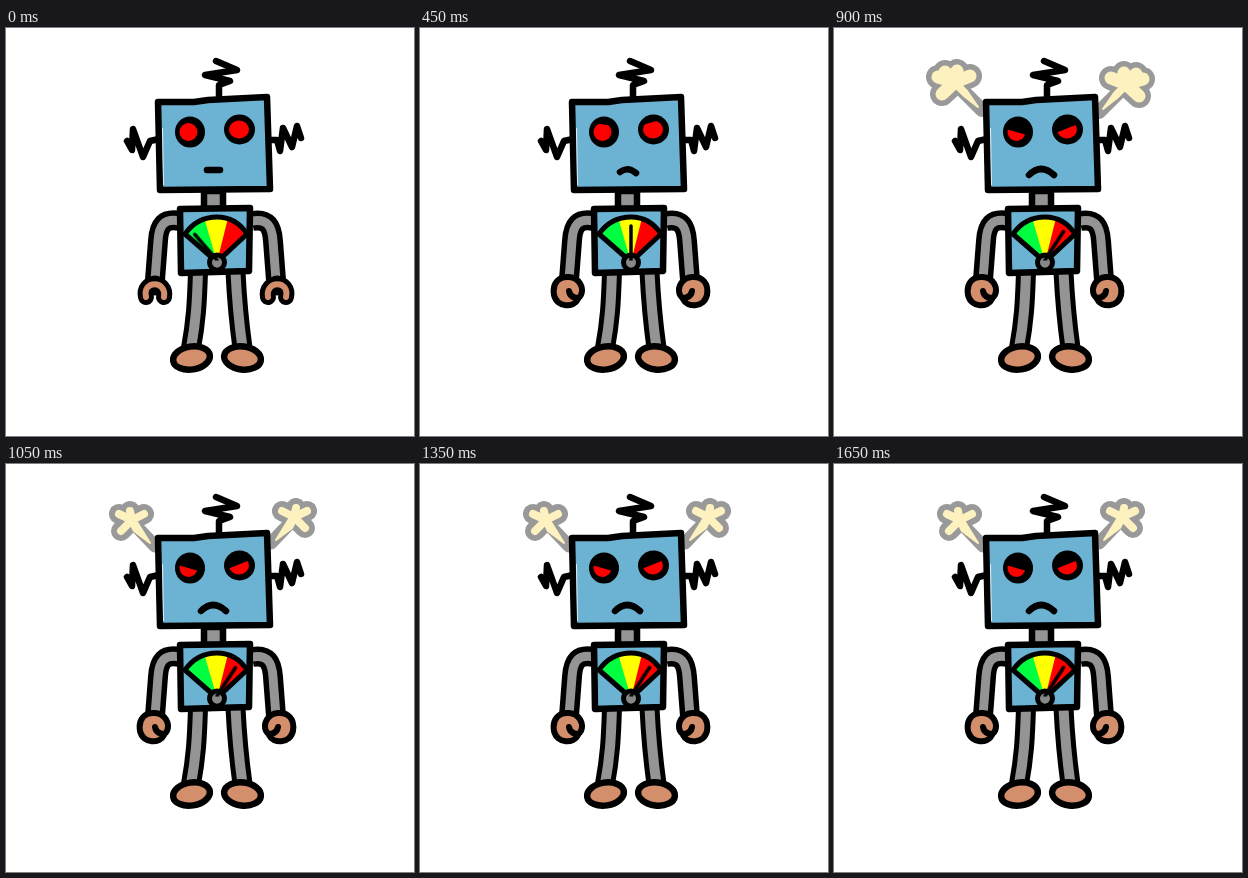
Recreate the animation shown at these times as an HTML page without scripts. Size 408x408 px, loop 1800 ms.

```html
<!DOCTYPE html>
<html lang="en">
<head>
<meta charset="utf-8">
<title>Robot losing its temper</title>
<style>
  html, body { margin: 0; width: 100%; height: 100%; overflow: hidden; background: #fff; }
  svg { display: block; width: 100vw; height: 100vh; }
  .ink { fill: none; stroke: #000; stroke-width: 6.5; stroke-linecap: round; stroke-linejoin: round; }
  .blue { fill: #6cb2d3; }
  .skin { fill: #d38e6c; }
  .tube { fill: none; stroke: #000; stroke-width: 20; }
  .core { fill: none; stroke: #949494; stroke-width: 9; }
  .steam { fill: none; stroke-linecap: round; stroke-linejoin: round; }
  .edge { stroke: #999; }
  .puff { stroke: #fdf2bf; }

  /* Twelve beats of 150 ms */
  .needle, .open, .closed, .big, .small { animation: 1.8s step-end infinite; }
  .needle { animation-name: needle; transform-origin: 211px 232px; }
  .open { animation-name: open; }
  .closed { animation-name: closed; }
  .big { animation-name: big; }
  .small { animation-name: small; }
  @keyframes needle {
    0% { transform: rotate(-41deg); }
    8.3333% { transform: rotate(-27deg); }
    16.6667% { transform: rotate(-13deg); }
    25% { transform: rotate(0deg); }
    33.3333% { transform: rotate(17deg); }
    41.6667%, 100% { transform: rotate(33deg); }
  }
  @keyframes open { 0% { opacity: 1; } 25%, 100% { opacity: 0; } }
  @keyframes closed { 0% { opacity: 0; } 25%, 100% { opacity: 1; } }
  @keyframes big {
    0%, 58.3333%, 75%, 91.6667%, 100% { opacity: 0; }
    50%, 66.6667%, 83.3333% { opacity: 1; }
  }
  @keyframes small {
    0%, 50%, 66.6667%, 83.3333% { opacity: 0; }
    58.3333%, 75%, 91.6667%, 100% { opacity: 1; }
  }
</style>
</head>
<body>
<svg viewBox="0 0 408 408">
  <defs>
    <clipPath id="eyeL"><circle cx="184" cy="104" r="14"/></clipPath>
    <clipPath id="eyeR"><circle cx="233.500" cy="101.500" r="14"/></clipPath>
    <clipPath id="fan"><path id="dial" d="M179 206Q191 189 211 189Q230 189 241 206L211 234Z"/></clipPath>

    <path id="cloud" d="M121 54L104 49M121 54L111 44M121 54L123 43M121 54L136 48M121 54L108 66"/>
    <path id="wisp" d="M126 56L113 50M126 56L124 47M126 56L138 50M126 56L115 67"/>
    <g id="plume">
      <use href="#cloud" class="edge" stroke-width="24"/>
      <path d="M124 58L148 82" class="edge" stroke-width="14"/>
      <use href="#cloud" class="puff" stroke-width="13"/>
      <path d="M120 58L130 68L144 79L133 63L125 55Z" fill="#fdf2bf" class="puff" stroke-width="2"/>
    </g>
    <g id="spurt">
      <use href="#wisp" class="edge" stroke-width="20"/>
      <path d="M128 60L149 82" class="edge" stroke-width="13"/>
      <use href="#wisp" class="puff" stroke-width="8"/>
      <path d="M122 55L128 67L144 79L131 58Z" fill="#fdf2bf" class="puff" stroke-width="2"/>
    </g>

    <path id="hook" d="M140 269C136 252 161 252 158 269"/>
    <g id="claw">
      <use href="#hook" class="ink" style="stroke-width:16"/>
      <path d="M149 256V259" class="ink" style="stroke-width:17"/>
      <use href="#hook" fill="none" stroke="#d38e6c" stroke-width="6" stroke-linecap="round"/>
      <path d="M140 260Q149 248 158 260Q149 256 140 260Z" class="skin"/>
    </g>
    <g id="fist">
      <circle cx="147.500" cy="263" r="14" class="skin"/>
      <path class="ink" style="stroke-width:6" d="M158 271C154 280 137 280 134 267C132 255 139 248 149 249C160 250 164 260 161 267C159 272 150 270 149 263"/>
    </g>

    <path id="arms" d="M174 193C158 190 153 197 152 213L149 252M246 193C262 190 266 199 267 213L270 252"/>
    <path id="legs" d="M192 244C191 275 190 293 185 320M229.500 244C231 275 233 295 236.500 320"/>
  </defs>

  <g class="steam big">
    <use href="#plume"/>
    <use href="#plume" transform="matrix(-1 0 0 1 413 2)"/>
  </g>
  <g class="steam small">
    <use href="#spurt"/>
    <use href="#spurt" transform="matrix(-1 0 0 1 414 -3)"/>
  </g>

  <!-- Limbs -->
  <use href="#arms" class="tube"/>
  <use href="#arms" class="core"/>
  <use href="#legs" class="tube"/>
  <use href="#legs" class="core" style="stroke-width:10"/>
  <g class="open">
    <use href="#claw"/>
    <use href="#claw" transform="matrix(-1 0 0 1 420 0)"/>
  </g>
  <g class="closed">
    <use href="#fist"/>
    <use href="#fist" transform="matrix(-1 0 0 1 421 0)"/>
  </g>
  <g class="ink">
    <ellipse class="skin" cx="185.500" cy="330" rx="18.500" ry="11.500" transform="rotate(-9 185.500 330)"/>
    <ellipse class="skin" cx="236.500" cy="330" rx="18.500" ry="11.500" transform="rotate(7 236.500 330)"/>
    <path d="M198 163H217V181H198Z" fill="#949494"/>
    <path class="blue" d="M174 181L244 180L243 243L175 245Z"/>
  </g>

  <!-- Gauge -->
  <g clip-path="url(#fan)">
    <path d="M170 180H250V240H170Z" fill="#ff0"/>
    <path d="M211 234L197 186H165V206Z" fill="#00ff40"/>
    <path d="M211 234L223 186H250V206Z" fill="#f00"/>
  </g>
  <use href="#dial" class="ink" style="stroke-width:5"/>
  <circle cx="211" cy="234.500" r="7.500" fill="#888" stroke="#000" stroke-width="5"/>
  <path class="ink needle" d="M211 232V198" style="stroke-width:3.500"/>
  <circle cx="211" cy="236" r="3.500" fill="#888"/>

  <!-- Head -->
  <g class="ink">
    <path d="M213 71V57L224 53L199 47L231 42L210 33"/>
    <path d="M153 111L144 113L137 129L127 101L126 122L121 113"/>
    <path d="M265 112L271 112L274 123L277 100L286 119L291 98L295 110"/>
    <path class="blue" d="M152 74L188 74L202 72L261 69L264 161L154 162Z"/>
  </g>
  <path d="M156.500 100L157.500 157" stroke="#fff" stroke-width=".8"/>
  <ellipse cx="184" cy="104" rx="15" ry="15.500"/>
  <ellipse cx="233.500" cy="101.500" rx="15.500" ry="15"/>
  <circle cx="182.500" cy="104" r="9" fill="#f00"/>
  <ellipse cx="233" cy="101.500" rx="10" ry="9" fill="#f00"/>
  <path clip-path="url(#eyeL)">
    <animate attributeName="d" dur="1.8s" repeatCount="indefinite" calcMode="discrete" keyTimes="0;.166667;.333333;.416667"
      values="M165 85H203V85L165 85Z;M165 85H203V99L165 94Z;M165 85H203V104L165 97Z;M165 85H203V110L165 99Z"/>
  </path>
  <path clip-path="url(#eyeR)">
    <animate attributeName="d" dur="1.8s" repeatCount="indefinite" calcMode="discrete" keyTimes="0;.166667;.333333;.416667"
      values="M214 83H252V83L214 83Z;M214 83H252V89L214 99Z;M214 83H252V91L214 104Z;M214 83H252V93L214 108Z"/>
  </path>
  <path class="ink" d="M201 142Q207 142 214 142">
    <animate attributeName="d" dur="1.8s" repeatCount="indefinite" calcMode="discrete" keyTimes="0;.166667;.333333;.416667"
      values="M201 142Q207 142 214 142;M200 144Q208 138 216 145;M198 145Q208 137 218 146;M195 147Q207 135 220 147"/>
  </path>
</svg>
</body>
</html>
```
